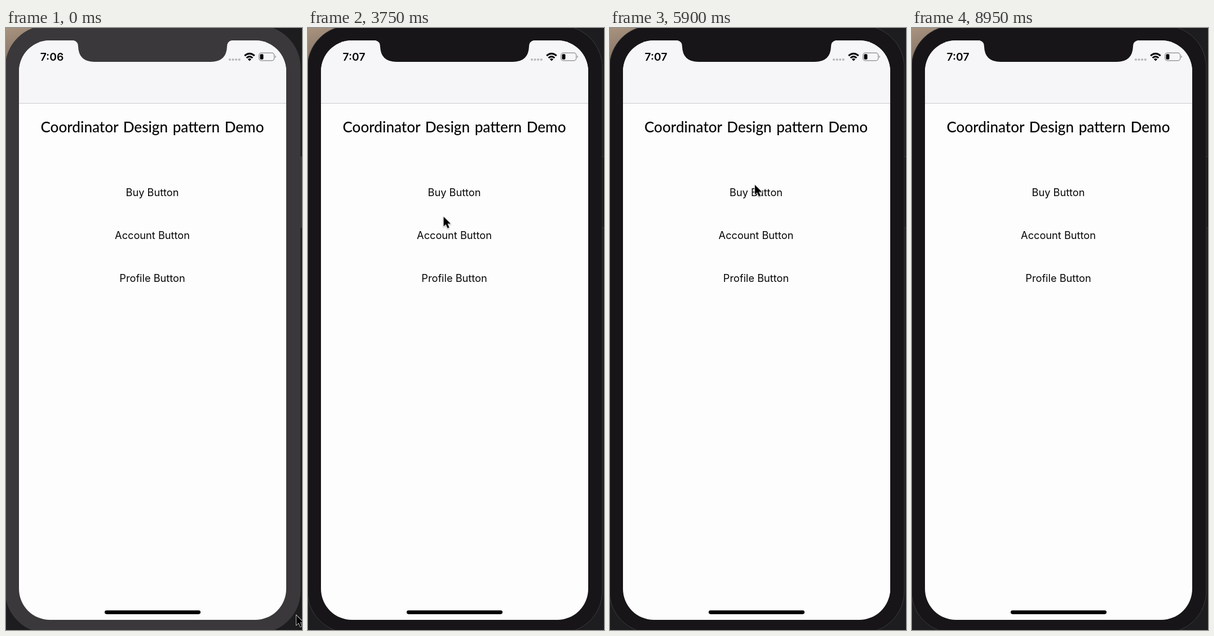
Write an HTML page that moves like this. It is 525 px wide and 1067 px high and loops after 9450 ms.

```html
<!DOCTYPE html>
<html lang="en">
<head>
<meta charset="utf-8">
<title>Coordinator demo</title>
<style>
  html, body { margin: 0; width: 100%; height: 100%; overflow: hidden; background: #1b191b; }
  svg { display: block; width: 100vw; height: 100vh; }
  text { font-family: Inter, "Liberation Sans", sans-serif; fill: #060606; }
  .title { font: 500 26.1px Lato, sans-serif; word-spacing: 2px; }
  .button { font-size: 18.2px; }
  .mid { text-anchor: middle; }
</style>
</head>
<body>
<svg viewBox="0 0 525 1067" preserveAspectRatio="none">
  <defs>
    <clipPath id="screen"><rect x="23" y="22" width="474" height="1027" rx="55"/></clipPath>
    <linearGradient id="desk" x2=".3" y2="1">
      <stop offset="0" stop-color="#a8937f"/><stop offset="1" stop-color="#7d6b5e"/>
    </linearGradient>
  </defs>

  <rect width="525" height="1067" fill="#1d1c1e"/>
  <rect width="70" height="70" fill="url(#desk)"/>
  <g id="bezel" stroke="#3b3a3c">
    <rect x="518.5" y="228" width="9" height="126" rx="2"/>
    <rect x="-1" y="-4" width="523" height="1076" rx="74"/>
  </g>

  <g clip-path="url(#screen)">
    <rect x="23" y="22" width="474" height="1027" fill="#fefdfe"/>
    <g id="home">
      <text class="title mid" x="259.5" y="184.5">Coordinator Design pattern Demo</text>
      <text class="button mid" x="259.5" y="298">Buy Button</text>
      <text class="button mid" x="259.5" y="374">Account Button</text>
      <text class="button mid" x="259.5" y="450">Profile Button</text>
    </g>
    <rect id="dim" x="23" y="133" width="474" height="916"/>
    <g id="page">
      <rect x="23" y="133" width="474" height="916" fill="#fefdfe"/>
      <text id="label" x="47.5" y="230" font-size="20.7"></text>
    </g>

    <rect x="23" y="22" width="474" height="111" fill="#f6f5f7"/>
    <rect id="glow" x="23" y="22" height="111" fill="#fff"/>
    <path d="M23 133.5H497" stroke="#cbcacd"/>
    <g id="back">
      <path d="M48 94L36 105.7L48 117.5" fill="none" stroke="#0879f0" stroke-width="3.4"/>
      <text id="backText" y="113" font-size="21" style="fill:#0879f0">Back</text>
    </g>

    <text id="clock" class="mid" x="81.5" y="58" font-size="19.3" font-weight="600"></text>
    <g fill="#b9b8ba">
      <circle cx="397" cy="56" r="2.1"/><circle cx="402.6" cy="56" r="2.1"/>
      <circle cx="408.2" cy="56" r="2.1"/><circle cx="413.8" cy="56" r="2.1"/>
    </g>
    <g fill="none" stroke="#060606" stroke-width="3">
      <path d="M423.2 49.2Q432 41.5 440.8 49.2"/>
      <path d="M426.6 53Q432 48.2 437.4 53"/>
      <path d="M428.8 55.2Q432 52.6 435.2 55.2L432 58.5Z" fill="#060606" stroke="none"/>
    </g>
    <rect x="448.7" y="44.2" width="27" height="13.6" rx="4" fill="none" stroke="#89888b" stroke-width="1.2"/>
    <rect x="450.5" y="46.3" width="6" height="9.4" rx="1.6" fill="#060606"/>
    <path d="M477.3 48.8Q480.3 51 477.3 53.2Z" fill="#89888b"/>
    <rect x="175" y="1032.3" width="170" height="6.6" rx="3.3"/>
  </g>
  <path id="notch" d="M116 21.5Q128 22 128 33Q129 60 157 60H363Q391 60 392 33Q392 22 404 21.5Z"/>

  <path id="cursor" d="M0 0V17.2L4 13.5L7 20.4L9.9 19.1L7 12.4H12.4Z" stroke="#fff" stroke-width="1.4"
        paint-order="stroke" style="filter:drop-shadow(0 1px 1px #0006)"/>
</svg>

<script>
const $ = id => document.getElementById(id);
const LOOP = 9450, STEP = 50, WIDTH = 474;
const buttons = document.querySelectorAll('.button');

// Times of: press on the button, push, press on Back, pop
const visits = [
  { label: 'Buy', press: 1500, push: 1666, hold: 2900, pop: 2982 },
  { label: 'Account', press: 3950, push: 4066, hold: 5300, pop: 5466 },
  { label: '', press: 6550, push: 6669, hold: 8050, pop: 8216 }
];

// Cursor tip: time, x, y
const path = [
  [0, 515, 1041], [50, 515, 1041], [450, 410, 345], [650, 410, 345],
  [1300, 294, 291], [1850, 294, 291], [2850, 73, 105], [3150, 73, 105],
  [3900, 260, 361], [4150, 260, 361], [4500, 242, 318], [5050, 92, 139],
  [5300, 73, 105], [5500, 73, 105], [5900, 257, 278], [6450, 247, 449],
  [6950, 247, 449], [7650, 86, 147], [8050, 73, 105], [8250, 73, 105],
  [8450, 73, 70]
];

// Critically damped spring
const spring = ms => {
  if (ms <= 0) return 0;
  const x = ms / 1000 * Math.sqrt(1000 / 3);
  return 1 - (1 + x) * Math.exp(-x);
};

// Slope at a point; zero beside a rest
function slope(i, k) {
  const a = path[i - 1], b = path[i], c = path[i + 1];
  if (!a || !c || a[k] === b[k] || b[k] === c[k]) return 0;
  return (c[k] - a[k]) / (c[0] - a[0]);
}

function cursorAt(t, k) {
  const i = path.findIndex(p => p[0] > t);
  if (i < 0) return path[path.length - 1][k];
  const a = path[i - 1], b = path[i], d = b[0] - a[0], u = (t - a[0]) / d;
  const e = u * u * (3 - 2 * u);
  return a[k] + (b[k] - a[k]) * e +
    d * u * (1 - u) * (slope(i - 1, k) * (1 - u) - slope(i, k) * u);
}

const move = (id, x, y = 0) => $(id).setAttribute('transform', `translate(${x} ${y})`);

function draw(t) {
  const visit = visits.find(v => t >= v.press && t < v.pop + 600);
  const p = visit ? spring(t - visit.push) * (1 - spring(t - visit.pop)) : 0;
  const rest = 1 - p;

  move('home', -0.3 * WIDTH * p);
  move('page', WIDTH * rest);
  $('label').textContent = visit ? visit.label : '';
  $('dim').setAttribute('opacity', 0.122 * p);
  $('glow').setAttribute('width', WIDTH * rest);
  $('glow').setAttribute('opacity', Math.min(0.7, 4 * p * rest));
  $('back').setAttribute('opacity', p * (visit && t >= visit.hold ? 0.28 : 1));
  $('backText').setAttribute('x', 53.5 + 66 * rest);

  buttons.forEach((b, i) => {
    const v = visits[i], fade = Math.max(0, t - v.push) / 270;
    b.setAttribute('opacity', t < v.press ? 1 : Math.min(1, 0.2 + 0.8 * fade));
  });

  const shell = t < 1500 ? '#3a383a' : '#171518';
  $('bezel').setAttribute('fill', shell);
  $('notch').setAttribute('fill', shell);
  $('clock').textContent = t < 1000 ? '7:06' : '7:07';

  move('cursor', cursorAt(t, 1), cursorAt(t, 2));
  $('cursor').setAttribute('opacity', t < 8450 ? 1 : 0);
}

function tick() {
  draw(Math.floor(performance.now() % LOOP / STEP) * STEP);
  requestAnimationFrame(tick);
}
tick();
</script>
</body>
</html>
```
